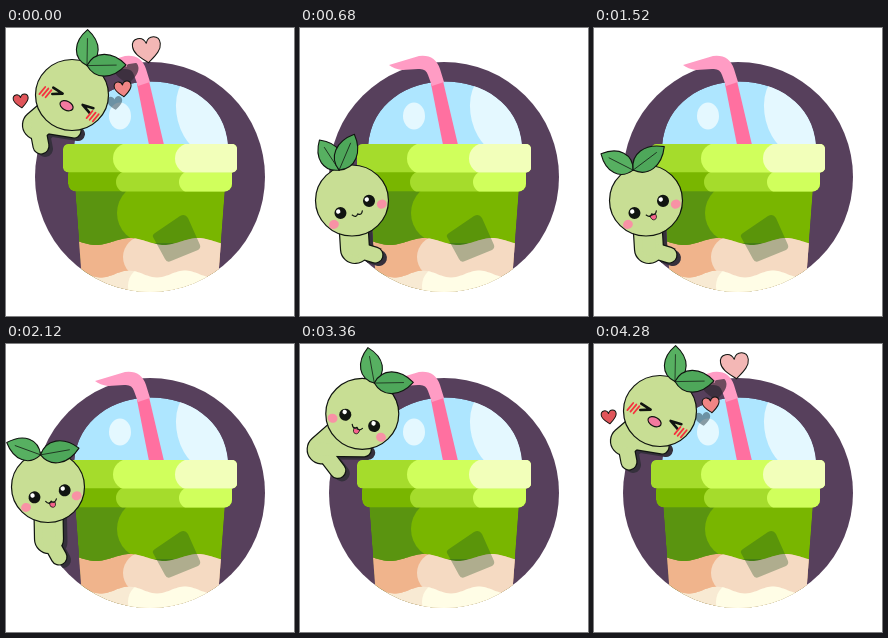
An HTML page with a canvas for the animation above (5.04 s loop, 288 by 288 pixels).

```html
<!DOCTYPE html>
<html lang="en">
<head>
<meta charset="utf-8">
<title>Sprout on a cup</title>
<style>
html, body { margin: 0; width: 100%; height: 100%; overflow: hidden; background: #fff; }
canvas { display: block; width: 288px; height: 288px; }
</style>
</head>
<body>
<canvas id="stage" width="288" height="288"></canvas>
<script>
'use strict';
const ctx = document.getElementById('stage').getContext('2d');
const LOOP = 5040, FALL_END = 680, CLIMB_START = 1520, STAGE_TIME = 600;
const TAU = Math.PI * 2, DEG = Math.PI / 180, INK = '#101410';
ctx.lineJoin = ctx.lineCap = 'round';

// Five stages of the climb, from the foot of the cup to the rim
const climb = {
  x: [52, 42, 50, 62, 66],
  y: [172.5, 143, 105, 70, 67],
  tilt: [-23, -13, 2, 21, 27],
  spread: [58, 75, 74, 50, 44],
  hipX: [55, 43, 30, 21, 31],
  hipY: [221, 195, 150, 106, 97],
  footX: [75, 53, 41, 38, 35],
  footY: [227, 213, 179, 127, 118]
};

const clamp = v => Math.max(0, Math.min(1, v));
const lerp = (a, b, k) => a + (b - a) * k;
function sample(list, u) {
  const i = Math.min(list.length - 2, Math.floor(u));
  return lerp(list[i], list[i + 1], u - i);
}

function poseAt(t) {
  const height = t < FALL_END
    ? 4 * (1 - clamp((t - 40) / (FALL_END - 40)))
    : 4 * clamp((t - CLIMB_START) / (4 * STAGE_TIME));
  const pose = { height };
  for (const part in climb) pose[part] = sample(climb[part], height);
  if (t < FALL_END) {
    pose.spread = lerp(44, 28, clamp((t - 40) / (FALL_END - 40)));
  } else if (t < CLIMB_START) {
    // After landing the body sinks a little and the leaves flop open
    const k = (t - FALL_END) / (CLIMB_START - FALL_END), sway = Math.sin(Math.PI * k);
    for (const part of ['y', 'hipY', 'footY']) pose[part] += 7 * sway;
    pose.spread = lerp(28, 58, k) + 18 * sway;
  }
  return pose;
}

function paint(path, fill, line = 0) {
  if (fill) { ctx.fillStyle = fill; ctx.fill(path); }
  if (line) { ctx.strokeStyle = INK; ctx.lineWidth = line; ctx.stroke(path); }
}
function ellipse(x, y, rx, ry = rx, turn = 0) {
  const p = new Path2D();
  p.ellipse(x, y, rx, ry, turn, 0, TAU);
  return p;
}
function rounded(x, y, w, h, r) {
  const p = new Path2D();
  p.roundRect(x, y, w, h, r);
  return p;
}

// Fills a shape, then lays round-ended bands [x, colour] inside it
function banded(shape, base, y, h, bands) {
  ctx.save();
  ctx.clip(shape);
  paint(shape, base);
  for (const [x, color] of bands) paint(rounded(x, y, 200, h, h / 2), color);
  ctx.restore();
}
function wave(y, crest, length) {
  const p = new Path2D();
  p.moveTo(60, 280);
  for (let x = 60; x <= 230; x += 2) p.lineTo(x, y + 3.5 * Math.cos((x - crest) / length * TAU));
  p.lineTo(230, 280);
  return p;
}

const disc = ellipse(144, 149, 115);
const dome = new Path2D('M68 118C74 32 216 32 222 118Z');
const cup = new Path2D('M69 160H219L211 266H77Z');

function drawCup() {
  paint(disc, '#57405c');
  ctx.save();
  ctx.clip(dome);
  paint(dome, '#aee6ff');
  paint(ellipse(199, 86, 28, 42, -.25), '#e4f8ff');
  ctx.restore();
  paint(ellipse(114, 88, 11, 13.5), '#e4f8ff');
  paint(new Path2D('M131 56L143 53L158 117H143Z'), '#ff70a0');
  paint(new Path2D('M89 37L119 28Q135 26 140 41L144 54L132 58L128 47Q126 40 118 41L102 42Q94 41 89 37Z'), '#ff9cc4');

  ctx.save();
  ctx.clip(disc);
  ctx.clip(cup);
  banded(cup, '#5a9410', 155, 60, [[111, '#79b600']]);
  banded(wave(213.5, 90, 68), '#f0b48c', 208, 42, [[117, '#f5dac2']]);
  banded(wave(246, 95, 56), '#f8ead3', 238, 40, [[122, '#fffde6']]);
  ctx.globalAlpha = .32;
  paint(new Path2D('M149 205L174 188Q179 185 182 190L194 217Q195 220 192 222L165 233Q161 235 159 231L147 209Q146 207 149 205Z'), '#1b5020');
  ctx.restore();

  banded(rounded(62, 138, 164, 25.5, 8), '#79b600', 143, 22, [[110, '#a5dc2c'], [173, '#d0ff5c']]);
  banded(rounded(57, 116, 174, 28.5, 5), '#a5dc2c', 115, 31, [[107, '#d0ff5c'], [169, '#f2ffba']]);
}

function drawLeaf(x, y, degrees, length, color) {
  const w = 14.5;
  const blade = new Path2D(), rib = new Path2D();
  blade.moveTo(0, 0);
  blade.bezierCurveTo(w, -length * .2, w, -length * .65, 0, -length);
  blade.bezierCurveTo(-w, -length * .65, -w, -length * .2, 0, 0);
  rib.moveTo(0, 0);
  rib.lineTo(0, -length * .75);
  ctx.save();
  ctx.translate(x, y);
  ctx.rotate(degrees * DEG);
  paint(blade, color, 1.1);
  paint(rib, null, .7);
  ctx.restore();
}

function drawFace(laugh, tongue) {
  if (laugh) {
    paint(new Path2D('M-20 2L-9 3L-18 8M25 2L14 4L24 8'), null, 2.6);
    paint(ellipse(0, 12, 7, 4.5), '#f2799f', 1.2);
    ctx.strokeStyle = '#f5333f';
    ctx.lineWidth = 1.8;
    for (const cheek of [-25, 28])
      for (const dx of [-3.5, 0, 3.5]) ctx.stroke(new Path2D(`M${cheek + dx + 1} 5l-2 9`));
    return;
  }
  for (const side of [-1, 1]) {
    paint(ellipse(side * 26, 15, 5, 4.5), '#f892a5');
    paint(ellipse(side * 15.5, 7, 6), INK);
    paint(ellipse(side * 15.5 - 1.5, 4.8, 2.2), '#fff');
  }
  if (tongue) paint(new Path2D('M-2.5 16H3.5Q4 21 .5 21Q-2.5 21 -2.5 16Z'), '#f5638c', .7);
  paint(new Path2D('M-5.5 13.5Q-3 18 0 14.5Q3 18 5.5 13.5'), null, 1.2);
}

function drawLimbs(limbs, color, extra) {
  ctx.strokeStyle = color;
  for (const [x0, y0, x1, y1, width] of limbs) {
    ctx.lineWidth = width + extra;
    ctx.beginPath();
    ctx.moveTo(x0, y0);
    ctx.lineTo(x1, y1);
    ctx.stroke();
  }
}

function drawSprout(pose, laugh, tongue) {
  const { x, y, tilt, spread, hipX, hipY, footX, footY, height } = pose;
  const reach = Math.min(36, 12 + 8 * height);
  const limbs = [
    [x, y, hipX, hipY, 29],
    [hipX, hipY, footX, footY, 16],
    [hipX, hipY, x + 2, y + reach, 14]
  ];
  ctx.save();
  ctx.clip(disc);
  ctx.translate(4, 3);
  drawLimbs(limbs, '#35303c', 0);
  ctx.restore();
  drawLimbs(limbs, INK, 1.2);
  drawLimbs(limbs, '#c6dd94', -1.2);
  paint(ellipse(x, y, 36.5, 35.5), '#c8de94', 1.2);

  const baseX = x + 33 * Math.sin(tilt * DEG), baseY = y - 33 * Math.cos(tilt * DEG);
  drawLeaf(baseX, baseY, tilt + 18 - spread, 36, '#57b061');
  drawLeaf(baseX, baseY, tilt + 18 + spread, 39, '#4ea75a');

  ctx.save();
  ctx.translate(x, y);
  ctx.rotate(tilt * DEG);
  drawFace(laugh, tongue);
  ctx.restore();
}

const heart = new Path2D('M0 .46C-.25 .25 -.5 .08 -.5 -.18C-.5 -.5 -.1 -.54 0 -.24C.1 -.54 .5 -.5 .5 -.18C.5 .08 .25 .25 0 .46Z');
function drawHeart(x, y, size, color, outline) {
  ctx.save();
  ctx.translate(x, y);
  ctx.rotate(-.12);
  ctx.scale(size, size);
  paint(heart, color, outline / size);
  ctx.restore();
}

// Hearts swell out of the head, then drift off as it drops
function drawHearts(t, shadows) {
  const swell = t >= 3680 ? clamp((t - 3600) / 600) : 1;
  const drift = t < 3680 ? Math.max(0, t - 40) / 280 : 0;
  if (drift >= 1) return;
  const reach = .6 + .4 * swell + drift * .15;
  const place = (x, y, size, color, outline) =>
    drawHeart(lerp(65, x, reach), lerp(68, y, reach), size * swell, color, outline);
  ctx.save();
  ctx.globalAlpha = 1 - drift * .9;
  if (shadows) {
    ctx.clip(disc);
    place(121, 45, 24, 'rgba(50,42,52,.7)', 0);
    place(109, 75, 15, 'rgba(45,65,75,.5)', 0);
  } else {
    place(141, 22, 28, '#f3b7b5', 1);
    place(117, 61, 17, '#f08585', 1);
    place(15, 73, 15, '#e0555a', 1);
  }
  ctx.restore();
}

// Each second has one 120 ms step followed by 80 ms steps; the end holds still
function stepped(t) {
  const second = Math.floor(t / 1000) * 1000, rest = t - second;
  return Math.min(4280, second + (rest < 120 ? 0 : Math.floor((rest - 40) / 80) * 80 + 40));
}

const started = performance.now();
function frame() {
  const t = stepped(Math.max(0, performance.now() - started) % LOOP);
  ctx.fillStyle = '#fff';
  ctx.fillRect(0, 0, 288, 288);
  drawCup();
  drawHearts(t, true);
  drawSprout(poseAt(t), t < 120 || t >= 3680, t >= 1360);
  drawHearts(t, false);
  requestAnimationFrame(frame);
}
frame();
</script>
</body>
</html>
```
